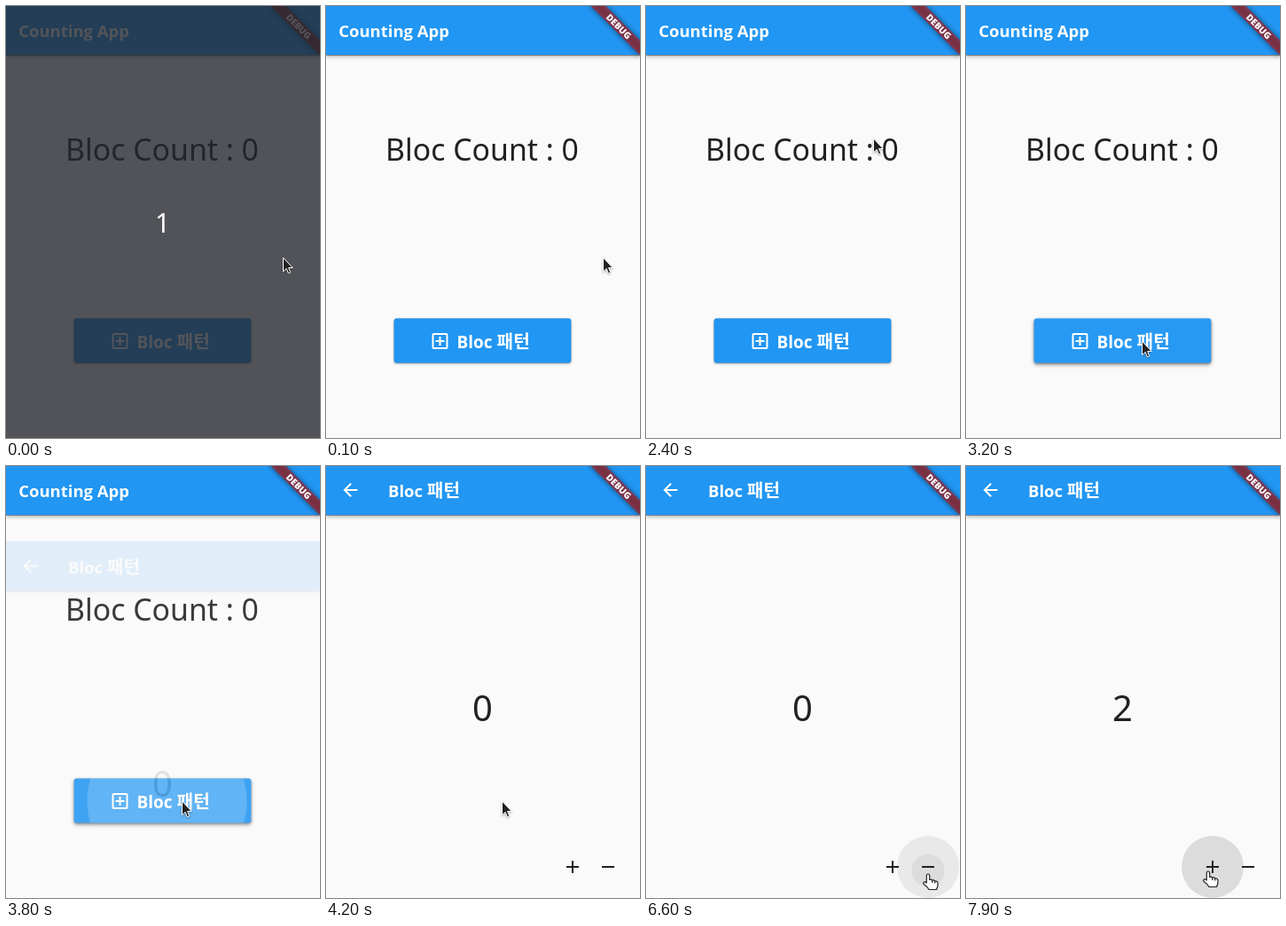
An HTML page for the animation above (8000 ms loop, 354 px wide and 486 px high).

```html
<!DOCTYPE html>
<html lang="ko">
<head>
<meta charset="utf-8">
<title>Counting App</title>
<style>
  html, body { margin: 0; width: 100%; height: 100%; overflow: hidden; background: #fafafa; }
  svg { display: block; font-family: "Open Sans", "Noto Sans CJK KR", sans-serif; }
  .bar { fill: #2196f3; filter: drop-shadow(0 1px .6px #0005) drop-shadow(0 2px 2px #0004); }
  .title, .label { font-weight: 700; font-size: 18.5px; fill: #fff; }
  .label { font-size: 19px; }
  .ko { font-size: 20.3px; }
  .big { font-family: "Noto Sans", sans-serif; text-anchor: middle; fill: #212121; }
  .line { fill: none; stroke-width: 2; }
  #button { fill: #2196f3; filter: drop-shadow(0 .5px .6px #0005) drop-shadow(0 1px 1.2px #0005); }
  #button.hover { fill: #2799f3; filter: drop-shadow(0 1px 1px #0005) drop-shadow(0 2px 2px #0005); }
  #arrow { fill: #222; stroke: #fff; filter: drop-shadow(0 1px 1px #0005); }
  #hand { fill: #fff; stroke: #222; stroke-width: 1.2; stroke-linejoin: round; }
</style>
</head>
<body>
<svg width="354" height="486" viewBox="0 0 354 486">
  <defs>
    <clipPath id="buttonClip"><rect x="76.7" y="351.5" width="199.6" height="50" rx="3"/></clipPath>
  </defs>

  <g id="home">
    <rect width="354" height="486" fill="#fafafa"/>
    <rect class="bar" y="-1" width="354" height="56"/>
    <text class="title" x="14.2" y="34.5">Counting App</text>
    <text class="big" x="176" y="174" font-size="33.8">Bloc Count : 0</text>
    <rect id="button" x="76.7" y="351.5" width="199.6" height="50" rx="3"/>
    <g clip-path="url(#buttonClip)"><circle id="ink" cy="377" fill="#fff" fill-opacity=".18"/></g>
    <g class="line" stroke="#fff">
      <rect x="120.5" y="369" width="16" height="16" rx="1"/>
      <path d="M123.5 377h10M128.5 372v10"/>
    </g>
    <text class="label" x="147.5" y="384.5">Bloc <tspan class="ko">패턴</tspan></text>
  </g>

  <g id="counter">
    <rect width="354" height="486" fill="#fafafa"/>
    <rect class="bar" y="-1" width="354" height="56"/>
    <path transform="translate(15.5 15)" fill="#fff" d="M20 11H7.83l5.59-5.59L12 4l-8 8 8 8 1.41-1.41L7.83 13H20z"/>
    <text class="title" x="70" y="35">Bloc <tspan class="ko">패턴</tspan></text>
    <text class="big" id="count" x="176.5" y="286.5" font-size="40">0</text>
    <circle id="halo" cy="451" r="35" fill-opacity=".065"/>
    <circle id="splash" fill-opacity=".055"/>
    <path class="line" stroke="#212121" d="M271 451h14M278 444v14M311 451h14"/>
  </g>

  <g transform="translate(354 -1) rotate(45)">
    <rect x="-40" y="28" width="80" height="12" fill-opacity=".5" style="filter: blur(3px)"/>
    <rect x="-40" y="28" width="80" height="12" fill="#b71c1c" fill-opacity=".627"/>
    <text y="37.7" text-anchor="middle" font-size="10.2" font-weight="800" fill="#fff">DEBUG</text>
  </g>

  <g id="countdown">
    <rect width="354" height="486" fill="#24272d" fill-opacity=".79"/>
    <text class="big" x="176.5" y="254.5" font-size="30" style="fill: #fff">1</text>
  </g>

  <g id="cursor">
    <path id="arrow" d="M.5 0V15.8L4.2 12.4 6.4 17.8 8.8 16.8 6.6 11.5H11.2Z"/>
    <path id="hand" d="M-1.7 1.7a1.7 1.7 0 0 1 3.4 0V6.5Q3.5 5.5 4.8 7 6.5 6.3 7.7 8 10.5 7.6 11 10V12Q11 14.5 9.5 17.5H1Q-1 14-5 11.2-5.8 8.6-3.5 8.8L-1.7 10ZM4.8 7v3M7.7 8v2.5"/>
  </g>
</svg>
<script>
const LOOP = 8000, STEP = 100;
const PLUS = 278, MINUS = 318, ICON_Y = 451;
const $ = id => document.getElementById(id);
const clamp = v => Math.min(1, Math.max(0, v));
const progress = (t, start, end) => clamp((t - start) / (end - start));
const set = (id, attrs) => { for (const k in attrs) $(id).setAttribute(k, attrs[k]); };
const show = (id, on) => set(id, { visibility: on ? 'visible' : 'hidden' });

// Point on a Bézier curve of any degree.
function along(points, k) {
  if (points.length === 1) return points[0];
  return along(points.slice(1).map(([x, y], i) => {
    const [px, py] = points[i];
    return [px + (x - px) * k, py + (y - py) * k];
  }), k);
}

// Easing from two control points, solved by bisection.
const ease = (...handles) => x => {
  const curve = [[0, 0], ...handles, [1, 1]];
  let lo = 0, hi = 1;
  for (let i = 0; i < 20; i++) {
    const mid = (lo + hi) / 2;
    if (along(curve, mid)[0] < x) lo = mid; else hi = mid;
  }
  return along(curve, hi)[1];
};
const slideEase = ease([.4, 0], [.2, 1]);
const fadeEase = ease([.42, 0], [1, 1]);

// Each pointer move continues from the last point of the one before.
const moves = [
  { start: 1100, end: 1200, path: [[301, 260]] },
  { start: 1300, end: 2000, path: [[-30, 200], [-30, 90], [130, 94]] },
  { start: 2100, end: 3100, path: [[400, 90], [157, 354], [198, 377]] },
  { start: 4700, end: 5200, path: [[272, 448]] },
  { start: 5600, end: 5700, path: [[318, 459]] },
  { start: 6900, end: 7300, path: [[273, 456]] }
];
const pointerAt = t => moves.reduce(
  (from, { start, end, path }) => along([from, ...path], progress(t, start, end)), [312, 283]);

const taps = [
  { at: 5600, x: PLUS, r: 18.5 },
  { at: 6200, x: MINUS, r: 35 },
  { at: 6600, x: MINUS, r: 18.5 },
  { at: 7500, x: PLUS, r: 35 },
  { at: 7900, x: PLUS, r: 35 }
];

function draw(t) {
  show('countdown', t < 100);

  const [x, y] = pointerAt(t);
  const hovered = [PLUS, MINUS].find(icon => Math.abs(x - icon) < 20 && Math.abs(y - ICON_Y) < 20);
  set('cursor', { transform: `translate(${x} ${y})` });
  show('arrow', !hovered);
  show('hand', hovered);
  show('halo', hovered);
  set('halo', { cx: hovered || 0 });

  $('button').classList.toggle('hover', t >= 3100);
  const press = progress(t, 3550, 3800);
  set('ink', { cx: 198 - 16.5 * press, r: Math.max(0, t - 3550) * .36 });

  // The new page rises a quarter of the height while fading in.
  const k = t < 4200 ? progress(Math.min(t, 4000), 3718, 4018) : 1;
  set('counter', { opacity: fadeEase(k), transform: `translate(0 ${121.5 * (1 - slideEase(k))})` });

  // Plus adds one, minus subtracts one but stops at zero.
  const done = taps.filter(tap => tap.at <= t);
  $('count').textContent = done.reduce((n, tap) => Math.max(0, n + (tap.x === PLUS ? 1 : -1)), 0);

  const tap = done.at(-1);
  const fresh = tap && tap.x === hovered && t < tap.at + 200;
  show('splash', fresh);
  if (fresh) set('splash', { cx: tap.x, cy: ICON_Y + (35 - tap.r) / 4, r: tap.r });
}

function tick() {
  draw(Math.floor(performance.now() % LOOP / STEP) * STEP);
  requestAnimationFrame(tick);
}
tick();
</script>
</body>
</html>
```
